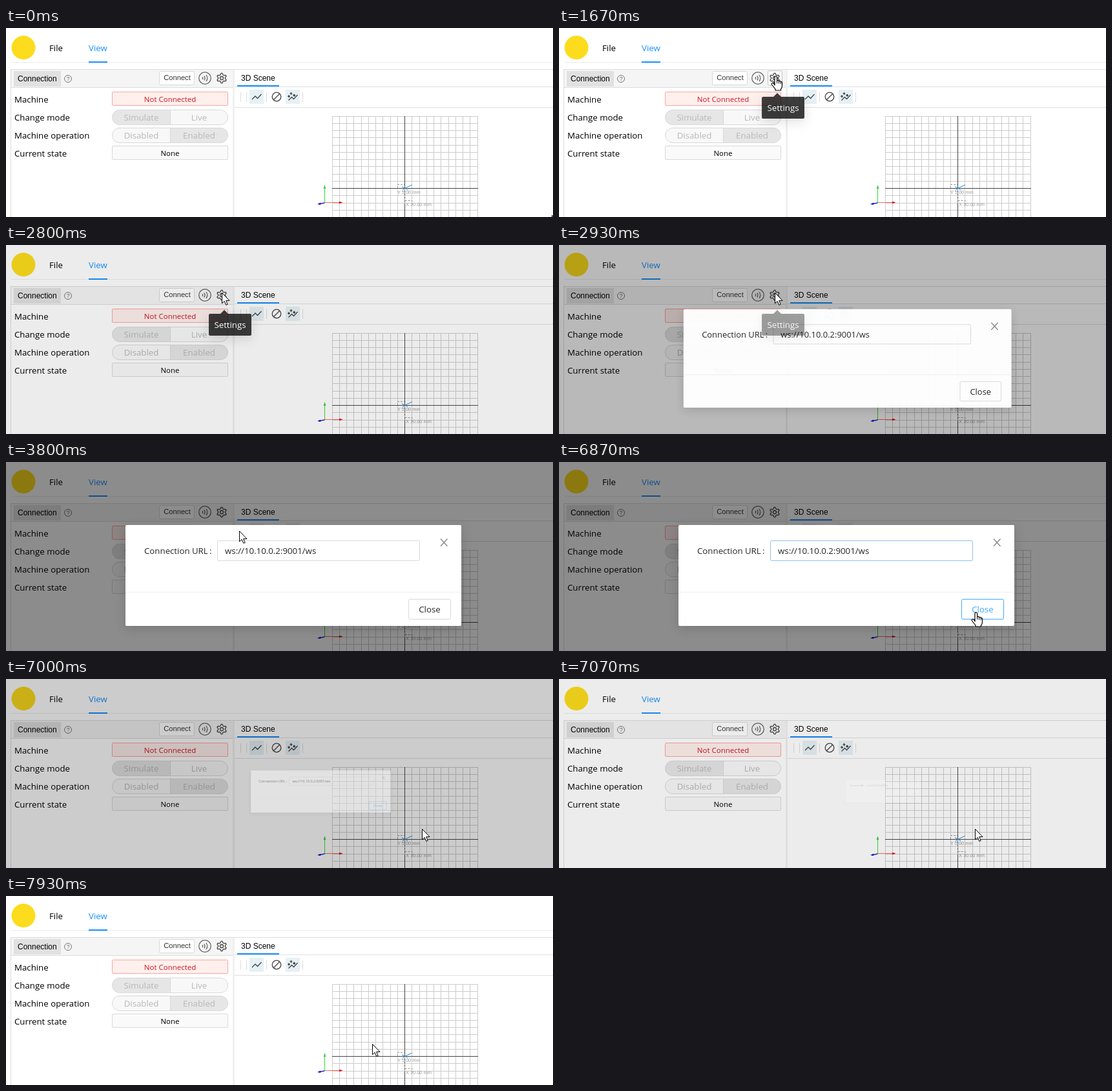
These frames come from a looping animation (847 px wide and 294 px high, 8 s). An HTML page:

```html
<!DOCTYPE html>
<html lang="en">
<head>
<meta charset="utf-8">
<title>Connection settings</title>
<style>
  html, body { margin: 0; width: 100%; height: 100%; overflow: hidden; background: #fff; }
  svg { display: block; }
  text { font: 13.25px "Open Sans", sans-serif; white-space: pre; }
  .arial { font: 12px "Liberation Sans", Arial, sans-serif; }
  .small { font-size: 11.5px; }
  .mid { text-anchor: middle; }
  .dim { fill: #b8b8b8; }
  .box { stroke: #d9d9d9; }
  .icon { fill: none; stroke: #444; stroke-width: 1.3; }
  .scene { font-size: 7.4px; fill: #999; }
  #tip { filter: drop-shadow(0 5px 9px rgba(0, 0, 0, .16)); }
  #panel { filter: drop-shadow(0 4px 8px rgba(0, 0, 0, .15)); }
</style>
</head>
<body>
<svg width="847" height="294" viewBox="0 0 847 294">
  <!-- Header -->
  <circle cx="27" cy="30.5" r="18.5" fill="#fcdc1c"/>
  <text x="67" y="36">File</text>
  <text x="128" y="36" fill="#1890ff">View</text>
  <path d="M8 53.5H847" stroke="#ececec"/>
  <path d="M128 53H157" stroke="#1890ff" stroke-width="2"/>

  <!-- Connection panel -->
  <path d="M8 65H351V92H8Z" fill="#f5f5f5"/>
  <path d="M351 65H354V294H351Z" fill="#f0f0f0"/>
  <path d="M7 64.5H847M7.5 64V294M8 92.5H351" fill="none" stroke="#dcdcdc"/>
  <path d="M12 67H85V91H12Z" fill="#e1e1e1"/>
  <text class="arial" x="18" y="83">Connection</text>
  <circle class="icon" cx="96" cy="79" r="5.5" style="stroke:#777;stroke-width:1"/>
  <text class="arial mid" x="96" y="82" fill="#666" style="font-size:8.5px">?</text>
  <rect class="box" x="237.5" y="67.5" width="54" height="21" rx="2" fill="#fff"/>
  <text class="arial mid" x="265" y="81" fill="#333" style="font-size:11.2px">Connect</text>
  <g class="icon" style="stroke:#666">
    <circle cx="308" cy="78" r="9.3"/>
    <path d="M304.5 76V80M307 74.5Q309 78 307 81.5M310 73Q313.5 78 310 83"/>
  </g>
  <rect id="gearBox" x="323.5" y="66.5" width="22" height="23" rx="2" fill="#fafafa" stroke="#c4c4c4"/>
  <g class="icon" transform="translate(334 78)">
    <path id="gear" stroke-linejoin="round"/>
    <circle r="2.5"/>
  </g>

  <text x="13" y="116">Machine</text>
  <text x="13" y="144">Change mode</text>
  <text x="13" y="172">Machine operation</text>
  <text x="13" y="200">Current state</text>
  <rect x="164.5" y="99.5" width="179" height="21" rx="1.5" fill="#fff0ed" stroke="#ffa39e"/>
  <text class="small mid" x="254" y="115" fill="#cf1322">Not Connected</text>
  <path d="M254 127.5H176A11.5 11.5 0 0 0 176 150.5H254Z" fill="#e6e6e6"/>
  <path d="M254 127.5H332A11.5 11.5 0 0 1 332 150.5H254Z" fill="#f8f8f8"/>
  <path d="M254 155.5H176A11.5 11.5 0 0 0 176 178.5H254Z" fill="#f8f8f8"/>
  <path d="M254 155.5H332A11.5 11.5 0 0 1 332 178.5H254Z" fill="#e6e6e6"/>
  <g class="box" fill="none">
    <rect x="164.5" y="127.5" width="179" height="23" rx="11.5"/>
    <rect x="164.5" y="155.5" width="179" height="23" rx="11.5"/>
    <path d="M254.5 128V150M254.5 156V178"/>
  </g>
  <g class="mid">
    <text class="dim" x="209.5" y="144">Simulate</text>
    <text class="dim" x="299" y="144">Live</text>
    <text class="dim" x="209.5" y="172">Disabled</text>
    <text class="dim" x="299" y="172">Enabled</text>
  </g>
  <rect class="box" x="164.5" y="183.5" width="179" height="21" rx="1.5" fill="#fafafa"/>
  <text class="small mid" x="254" y="199">None</text>

  <!-- Scene panel -->
  <path d="M354 91.5H847M354 123.5H847" stroke="#e0e0e0"/>
  <path d="M358 90H423" stroke="#1890ff" stroke-width="2"/>
  <text class="arial" x="364" y="82">3D Scene</text>
  <path d="M363.5 100V115M372.5 100V115M403.5 100V115M459.5 100V115" stroke="#ddd"/>
  <path d="M377 96H399V118H377ZM433 96H455V118H433Z" fill="#e6f1f6"/>
  <g class="icon">
    <path d="M381 111L386 106L389.5 109.5L395.5 103"/>
    <circle cx="419" cy="107" r="6.8"/>
    <path d="M414.3 111.7L423.7 102.3M437.5 112.5L442.5 107.5L445.5 110.5L451.5 104"/>
  </g>
  <path d="M441.5 99.5L442.5 101.2L444 102L442.5 102.8L441.5 104.5L440.5 102.8L439 102L440.5 101.2ZM438 104L440 106.2L438 108.5L436 106.2ZM446.2 102.5L448.5 104.7L446.2 107L444 104.7Z" fill="#444"/>
  <path id="grid" stroke="#ccc" fill="none"/>
  <path d="M505 249.5H731M617.5 137V294" stroke="#444"/>
  <path d="M606.5 249V243.5H617M617.5 268.5H629V275M617.5 250V275" fill="none" stroke="#999" stroke-dasharray="3 2"/>
  <path d="M613 247L618 249L629 244M614 252L618 249L622 252" fill="none" stroke="#2a8fdd"/>
  <text class="arial scene" x="606" y="258">Y 5.00 mm</text>
  <text class="arial scene" x="619" y="277">X 10.00 mm</text>
  <g fill="none">
    <path d="M493.5 272V249" stroke="#2ee02e"/>
    <path d="M494 271.5H517" stroke="#ff6060"/>
    <path d="M493.5 272L486 273.5" stroke="#2020e0" stroke-width="1.4"/>
  </g>
  <path d="M493.5 244L495.3 250H491.7Z" fill="#3c3"/>
  <path d="M521.5 271.5L516 269.8V273.2Z" fill="#e00"/>
  <path d="M482 274L487 271.8V275Z" fill="#00c"/>

  <rect id="mask" width="847" height="294"/>

  <!-- Dialog -->
  <g id="dialog">
    <rect id="panel" x="185" y="98" width="520" height="157" rx="2" fill="#fff"/>
    <path d="M185 202.5H705" stroke="#f0f0f0"/>
    <g fill="#262626">
      <text x="214" y="143">Connection URL</text>
      <text x="315" y="143">:</text>
    </g>
    <rect id="glow" x="326" y="121" width="316" height="34" rx="3" fill="none" stroke="#d1e9ff" stroke-width="2"/>
    <rect id="field" x="327.5" y="122.5" width="313" height="31" rx="2" fill="#fff"/>
    <rect id="selection" x="339" y="127" width="139" height="22" fill="#1890ff"/>
    <text id="url" x="339" y="143">ws://10.10.0.2:9001/ws</text>
    <path d="M673 119.5L683.5 131M683.5 119.5L673 131" stroke="#858585" stroke-width="1.3"/>
    <rect id="close" x="623.5" y="213.5" width="65" height="31" rx="2" fill="#fff"/>
    <text id="closeLabel" class="mid" x="656" y="234">Close</text>
  </g>

  <g id="tip">
    <path d="M316 107H332L338 101L344 107H378Q380 107 380 109V139Q380 141 378 141H316Q314 141 314 139V109Q314 107 316 107Z" fill="#000" fill-opacity=".75"/>
    <text class="mid" x="347" y="129" fill="#fff">Settings</text>
  </g>

  <!-- Pointers, each with its hot spot at 0,0 -->
  <g id="cursor" stroke="#000" stroke-linejoin="round">
    <path id="arrow" d="M-.5 -.5V15.8L3.2 12.4L5.8 18.4L8.2 17.4L5.7 11.5H11Z" fill="#fff"/>
    <g id="hand" fill="#fff">
      <path stroke-width="1.2" d="M-1 14V2Q-1 0 .8 0T2.6 2V7Q4.5 5.5 5.5 7.8Q7.6 6.5 8.3 8.8Q10.5 8 10.5 10.5V15Q10.5 18 8.5 20V22H0V20L-5.5 13Q-6.5 11 -4.5 10.5T-1 14Z"/>
      <path fill="none" d="M2.6 7V11M5.5 8V11.5M8.3 9V12"/>
    </g>
    <path id="beam" fill="none" d="M-3.5 -7.5H-1Q0 -7.5 0 -6.5Q0 -7.5 1 -7.5H3.5M0 -6.5V6.5M-3.5 7.5H-1Q0 7.5 0 6.5Q0 7.5 1 7.5H3.5"/>
  </g>
</svg>
<script>
const LOOP = 8000, FPS = 15;
const el = id => document.getElementById(id);
const set = (id, attrs) => { for (const k in attrs) el(id).setAttribute(k, attrs[k]); };
const ramp = (n, start, length) => Math.min(1, Math.max(0, (n - start) / length));
const mix = (a, b, k) => `rgb(${a.map((v, i) => Math.round(v + (b[i] - v) * k))})`;
const GREY = [217, 217, 217], INK = [38, 38, 38], BLUE = [64, 169, 255];

const circInOut = u => u < .5
  ? (1 - Math.sqrt(1 - 4 * u * u)) / 2
  : (1 + Math.sqrt(1 - (2 - 2 * u) ** 2)) / 2;

// Pointer moves: start step, number of steps, destination
const moves = [[5, 16, 335, 75], [53, 13, 386, 139], [86, 13, 645, 234], [116, 13, 456, 227]];

function pointerAt(n) {
  let x = 846, y = 292;
  for (const [start, length, toX, toY] of moves) {
    const k = 1 - (1 - ramp(n, start, length)) ** 2;
    x += (toX - x) * k;
    y += (toY - y) * k;
  }
  return [x, y];
}

function pointerShape(n, x, y) {
  const inside = (l, t, r, b) => x >= l && x <= r && y >= t && y <= b;
  if (n < 38 && inside(323, 66, 346, 90)) return 'hand';
  if (n > 46 && n < 104) {
    if (inside(327, 122, 641, 154)) return 'beam';
    if (inside(623, 213, 689, 245)) return 'hand';
  }
  return 'arrow';
}

function drawStatic() {
  let grid = '';
  for (let i = 0; i <= 20; i++) {
    const d = i * 11.25;
    grid += `M${Math.floor(505 + d) + .5} 137V294`;
    if (137 + d < 294) grid += `M505 ${Math.floor(137 + d) + .5}H731`;
  }
  set('grid', { d: grid });

  const points = [];
  for (let i = 0; i < 24; i++) {
    const a = (i - .5) * Math.PI / 12, r = i % 4 < 2 ? 7.6 : 5.4;
    points.push((r * Math.sin(a)).toFixed(2) + ' ' + (r * Math.cos(a)).toFixed(2));
  }
  set('gear', { d: 'M' + points.join('L') + 'Z' });
}

function draw(n) {
  set('gearBox', { opacity: n < 40 ? ramp(n, 18, 5) : 0 });
  set('tip', { opacity: ramp(n, 21, 3) * (1 - ramp(n, 43, 2)) });

  const leaving = ramp(n, 103, 3.6);
  set('mask', { opacity: .45 * ramp(n, 41.25, 4.5) * (1 - leaving) });

  const opened = 1 - (1 - ramp(n, 42, 4.5)) ** 6;
  const size = .2 + .8 * opened * (1 - circInOut(leaving));
  set('dialog', {
    opacity: opened * (1 - leaving),
    transform: `translate(518 174) scale(${size}) translate(-518 -174)`
  });

  const selected = n >= 73 && n < 100;
  const closeHover = ramp(n, 92, 4.5);
  set('field', { stroke: mix(GREY, BLUE, ramp(n, 58, 4.5) * (1 - ramp(n, 100, 6))) });
  set('glow', { opacity: ramp(n, 66, 2) * (1 - ramp(n, 99, 3)) });
  set('selection', { opacity: +selected });
  set('url', { fill: selected ? '#fff' : '#262626' });
  set('close', { stroke: mix(GREY, BLUE, closeHover) });
  set('closeLabel', { fill: mix(INK, BLUE, closeHover) });

  const [x, y] = pointerAt(n), shape = pointerShape(n, x, y);
  set('cursor', { transform: `translate(${Math.round(x)} ${Math.round(y)})` });
  for (const id of ['arrow', 'hand', 'beam']) set(id, { display: id === shape ? 'inline' : 'none' });
}

function tick() {
  draw(Math.floor(performance.now() % LOOP * FPS / 1000 + .06));
  requestAnimationFrame(tick);
}

drawStatic();
tick();
</script>
</body>
</html>
```
